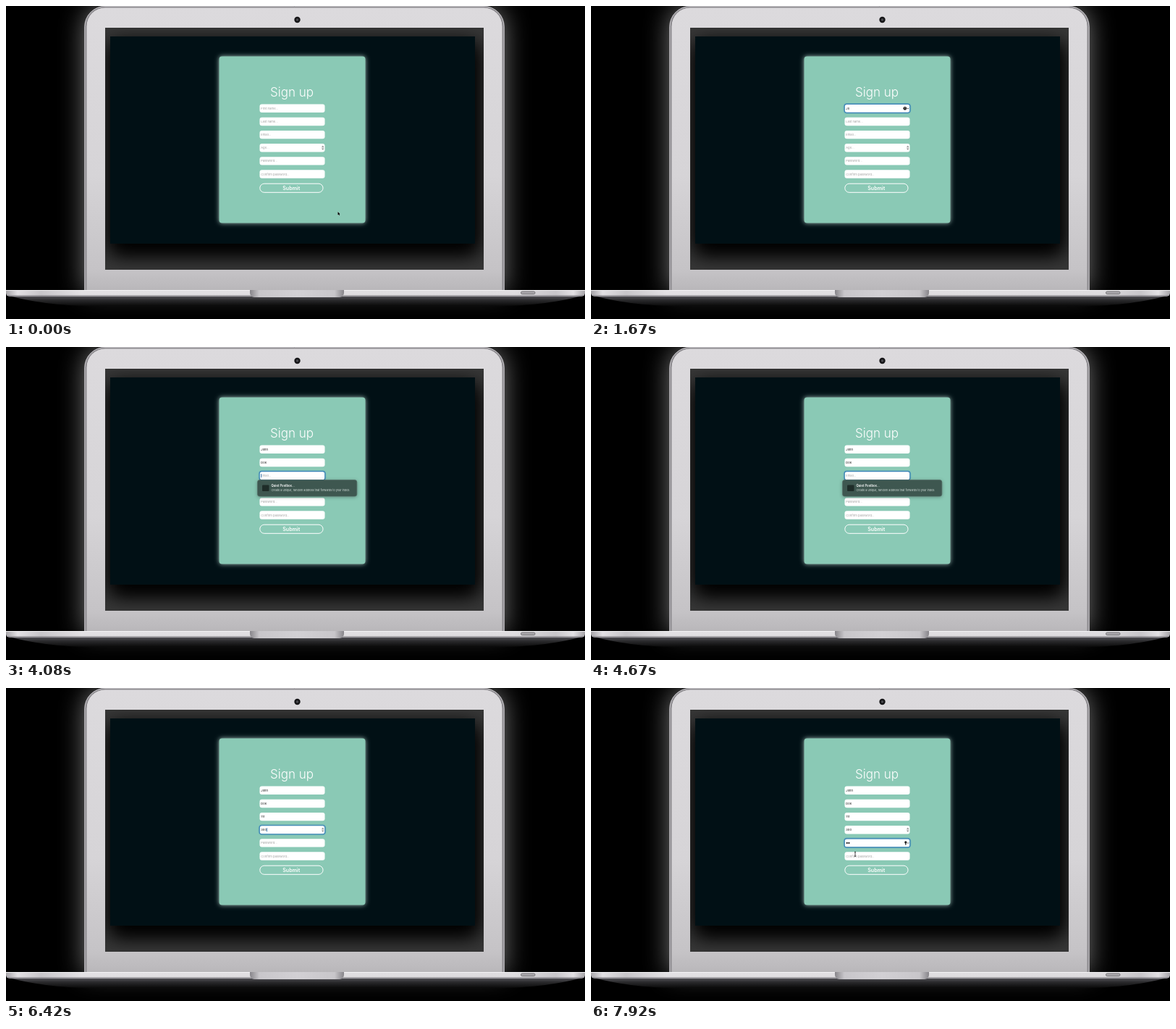
These frames come from a looping animation (800 by 432 pixels, 8 s). An HTML page with a canvas:

```html
<!DOCTYPE html>
<html lang="en">
<head>
<meta charset="utf-8">
<title>Sign up form</title>
<style>
  html, body { margin: 0; width: 800px; height: 432px; overflow: hidden; background: #000; }
  canvas { display: block; }
</style>
</head>
<body>
<canvas id="stage" width="800" height="432"></canvas>
<script>
const LOOP = 8000, STEP = 1000 / 12;
const FONT = 'Inter, "Open Sans", sans-serif';
const stage = document.getElementById('stage').getContext('2d');
let c = stage;

function box(x, y, w, h, r) {
  c.beginPath();
  c.roundRect(x, y, w, h, r);
}

function ramp(x0, y0, x1, y1, stops) {
  const g = c.createLinearGradient(x0, y0, x1, y1);
  stops.forEach(([at, color]) => g.addColorStop(at, color));
  return g;
}

function fill(style) {
  c.fillStyle = style;
  c.fill();
}

function outline(style, width) {
  c.strokeStyle = style;
  c.lineWidth = width;
  c.stroke();
}

function glow(color, blur, dx = 0, dy = 0) {
  c.shadowColor = color;
  c.shadowBlur = blur;
  c.shadowOffsetX = dx;
  c.shadowOffsetY = dy;
}

function text(str, x, y, size, color, weight = 400, align = 'left') {
  c.font = `${weight} ${size}px ${FONT}`;
  c.textAlign = align;
  c.fillStyle = color;
  c.fillText(str, x, y);
}

function drawLid() {
  c.save();
  glow('rgba(255,255,255,.45)', 34);
  box(108, 0, 581, 393, [29, 29, 0, 0]);
  fill('#858387');
  c.restore();
  box(109, .5, 579, 393, [28, 28, 0, 0]);
  outline('#c9c7cb', 1);
  box(111, 2, 575, 391, [26, 26, 0, 0]);
  fill(ramp(0, 0, 0, 392, [[0, '#dcdadd'], [.6, '#d6d4d7'], [.93, '#c5c3c6'], [1, '#b9b7ba']]));
  outline('#8f8d91', 1);

  c.beginPath();
  c.arc(402.5, 19, 4.2, 0, 7);
  fill('#161618');
  c.beginPath();
  c.arc(402.5, 19, 1.7, 0, 7);
  fill('#4b4b50');
}

function drawScreen() {
  c.save();
  box(137, 30, 523, 334, 0);
  fill('#363636');
  c.clip();
  glow('#000', 26, 2, 12);
  box(144, 42, 504, 286, 0);
  fill('#011015');
  fill('#011015');
  c.restore();
  box(144, 42, 504, 286, 0);
  fill('#011015');
}

function drawBase() {
  c.beginPath();
  c.moveTo(0, 399);
  c.bezierCurveTo(35, 408, 70, 414, 125, 414);
  c.lineTo(675, 414);
  c.bezierCurveTo(730, 414, 765, 408, 800, 399);
  fill(ramp(0, 400, 0, 415, [[0, '#55545a'], [.4, '#2a2a2c'], [1, '#050505']]));

  box(0, 392, 800, 9, [1, 1, 5, 5]);
  fill(ramp(0, 0, 800, 0, [[0, '#a6a4a8'], [.02, '#e2e0e3'], [.06, '#c7c5c9'],
    [.13, '#e2e0e3'], [.88, '#dedcdf'], [.95, '#c7c5c9'], [.98, '#e2e0e3'], [1, '#a6a4a8']]));
  c.fillStyle = '#f4f3f5';
  c.fillRect(0, 392, 800, 1);
  c.fillStyle = 'rgba(90,88,94,.45)';
  c.fillRect(3, 399, 794, 2);

  box(337, 392, 130, 10, [0, 0, 6, 6]);
  fill(ramp(337, 0, 467, 0, [[0, '#87858a'], [.1, '#c8c6ca'], [.5, '#d2d0d4'], [.9, '#c8c6ca'], [1, '#87858a']]));
  box(711.5, 394, 19.5, 3.6, 1.8);
  fill('#a9a7ab');
  outline('#6e6c70', .9);
}

function drawCard() {
  c.save();
  glow('rgba(200,235,225,.8)', 6);
  box(294.5, 69.5, 202, 230, 4);
  fill('#8ac9b5');
  c.restore();
  text('Sign up', 395, 125, 17, '#fff', 300, 'center');
  box(350.8, 245.2, 87.2, 12.1, 6);
  outline('#fff', 1);
  text('Submit', 394.2, 253.8, 7, '#fff', 600, 'center');
}

const backdrop = document.createElement('canvas');
backdrop.width = 800;
backdrop.height = 432;
c = backdrop.getContext('2d');
c.fillRect(0, 0, 800, 432);
drawLid();
drawScreen();
drawBase();
drawCard();
c = stage;

// keys: times at which each further character appears
const fields = [
  { hint: 'First name...', value: 'John', keys: [1320, 1660, 1910, 2080], focus: [740, 2570], icon: 'contact' },
  { hint: 'Last name...', value: 'Doe', keys: [3160, 3320, 3490], focus: [2570, 3910], icon: 'contact' },
  { hint: 'Email...', value: '111', keys: [4820, 4990, 5160], focus: [3910, 5740] },
  { hint: 'Age...', value: '300', keys: [6160, 6240, 6410], focus: [5740, 6990], spinner: true },
  { hint: 'Password...', value: '••', keys: [7320, 7490], focus: [6990, LOOP], icon: 'key' },
  { hint: 'Confirm password...', value: '', keys: [], focus: [LOOP, LOOP] }
];
const caretSpans = [[740, 1080], [3320, 3660], [3910, 4400], [5740, 6070], [6160, 6660], [6990, 7240]];
const within = (t, [from, to]) => t >= from && t < to;

function drawIcon(kind, y) {
  c.fillStyle = '#222';
  c.beginPath();
  if (kind === 'contact') {
    c.arc(433.8, y, 2.4, 0, 7);
    c.fill();
    c.beginPath();
    c.arc(433.8, y - .6, .8, 0, 7);
    fill('#aaa');
  } else {
    c.arc(434.8, y - 1, 1.6, 0, 7);
    c.fill();
    c.fillRect(434.2, y, 1.2, 2.8);
  }
  c.beginPath();
  c.moveTo(437, y - .5);
  c.lineTo(438, y + .6);
  c.lineTo(439, y - .5);
  outline('#222', .8);
}

function drawSpinner(y) {
  box(436.4, y - 2.9, 2.6, 5.8, 1.2);
  fill('#ddd');
  c.beginPath();
  for (const s of [-1, 1]) {
    c.moveTo(436.8, y + s * .9);
    c.lineTo(437.7, y + s * 2.2);
    c.lineTo(438.6, y + s * .9);
  }
  outline('#555', .7);
}

function drawField(field, i, t) {
  const y = 141.3 + i * 18.15;
  const focused = within(t, field.focus);
  if (focused) {
    box(349.8, y - 6.3, 91.4, 12.6, 3.4);
    outline('rgba(60,135,190,.35)', 2.2);
  }
  box(350.5, y - 5.7, 90, 11.4, 3);
  fill('#fff');
  if (focused) {
    box(350.2, y - 6, 90.6, 12, 3.2);
    outline('#3b84b6', 1.2);
  }

  const typed = field.value.slice(0, field.keys.filter(k => t >= k).length);
  let end = 352.4;
  if (typed[0] === '•') {
    for (const j of typed.split('').keys()) {
      c.beginPath();
      c.arc(353.7 + j * 2.7, y, 1.05, 0, 7);
      fill('#111');
      end = 355.2 + j * 2.7;
    }
  } else {
    text(typed || field.hint, 352.3, y + 1.5, 4.1, typed ? '#111' : '#a2a2a2');
    if (typed) end += c.measureText(typed).width;
  }
  if (focused && caretSpans.some(span => within(t, span))) {
    c.fillStyle = '#2b6fb0';
    c.fillRect(end, y - 2.6, .8, 5.2);
  }
  if (field.spinner) drawSpinner(y);
  if (focused && field.icon) drawIcon(field.icon, y);
}

function drawPopup(t) {
  const alpha = Math.min((t - 3830) / 170, (4990 - t) / 170, 1);
  if (alpha <= 0) return;
  c.save();
  c.globalAlpha = alpha;
  glow('rgba(0,0,0,.35)', 5, 0, 1);
  box(347.5, 183.5, 137.3, 22.6, 3);
  fill('#3e5750');
  glow('transparent', 0);
  outline('#526b64', .6);
  box(354, 190.5, 9.5, 8.5, 1);
  fill('#1f2d29');
  text('Quiet Postbox...', 366.5, 193.4, 4.2, '#fff', 600);
  text('Create a unique, random address that forwards to your inbox.', 366.5, 199.2, 3.75, '#d5dfdb');
  c.restore();
}

// Each move: start, end, from, to, then how long the pointer rests before hiding
const moves = [
  { span: [250, 750], from: [458.5, 284], to: [361, 142], rest: 330 },
  { span: [2170, 2500], from: [361, 142], to: [361.5, 157], rest: 420 },
  { span: [5410, 5740], from: [361.8, 156.3], to: [362.5, 195], rest: 340 },
  { span: [6660, 6990], from: [362.5, 195], to: [364, 214], rest: 250 },
  { span: [7570, 7920], from: [364, 214], to: [365, 229.3], rest: 200 }
];

function drawArrow(x, y) {
  c.beginPath();
  [[0, 0], [0, 4.6], [1.1, 3.7], [1.8, 5.2], [2.5, 4.9], [1.8, 3.4], [3.2, 3.3]]
    .forEach(([dx, dy]) => c.lineTo(x + dx, y + dy));
  c.closePath();
  outline('rgba(255,255,255,.6)', .5);
  fill('#000');
}

function drawBeam(x, y) {
  c.beginPath();
  c.moveTo(x, y - 2.8);
  c.lineTo(x, y + 2.8);
  for (const s of [-1, 1]) {
    c.moveTo(x - 1, y + s * 3);
    c.lineTo(x + 1, y + s * 3);
  }
  outline('#111', .8);
}

function drawPointer(t) {
  const move = moves.find(({ span: [a, b], rest }, i) => within(t, [i ? a : 0, b + rest]));
  if (!move) return;
  const [a, b] = move.span;
  const p = Math.max(0, Math.min(1, (t - a) / (b - a)));
  const ease = p * p * (3 - 2 * p);
  const [x, y] = move.from.map((v, i) => v + (move.to[i] - v) * ease);
  const overField = x > 350 && x < 440 && Math.abs((y - 141.3 + 9.07) % 18.15 - 9.07) < 5.8 && y < 240;
  (overField ? drawBeam : drawArrow)(x, y);
}

function frame(now) {
  const t = Math.floor(((now % LOOP) + 4) / STEP) * STEP;
  c.drawImage(backdrop, 0, 0);
  fields.forEach((field, i) => drawField(field, i, t));
  drawPopup(t);
  drawPointer(t);
  requestAnimationFrame(frame);
}
requestAnimationFrame(frame);
</script>
</body>
</html>
```
